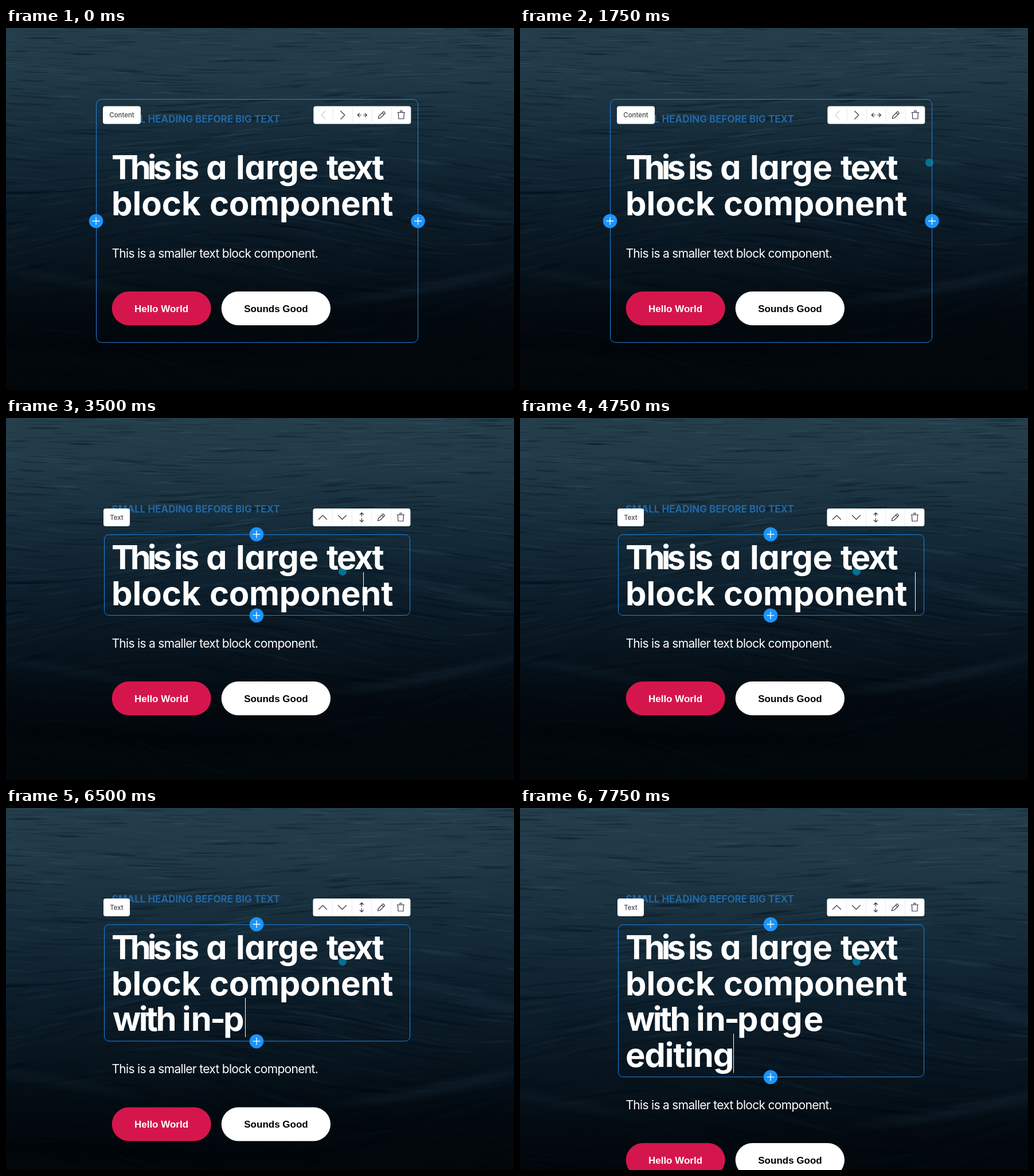
Animation of 886x632 px, one loop 8000 ms. Source, as an HTML page with a canvas:

```html
<!DOCTYPE html>
<html lang="en">
<head>
<meta charset="utf-8">
<title>In-page editing</title>
<style>
  html, body { margin: 0; width: 100%; height: 100%; overflow: hidden; background: #03080c; }
  canvas, svg { position: absolute; left: 0; top: 0; width: 886px; height: 632px; }
  canvas { transform-origin: 50% 0; }
  text { font-family: Inter, "Open Sans", sans-serif; font-optical-sizing: none; white-space: pre; }
  .eyebrow { font-size: 17px; font-weight: 700; fill: #2067a6; }
  .title { font-size: 58px; font-weight: 700; fill: #fff; font-feature-settings: "cv11" 1; }
  .body { font-size: 21px; letter-spacing: -.7px; fill: #fff; }
  .button { font: bold 17px "Liberation Sans", Arial, sans-serif; text-anchor: middle; }
  .tag { font-size: 11.4px; font-weight: 500; fill: #45424f; text-anchor: middle; }
  .frame { fill: none; stroke: #1d86e8; }
  .icon { fill: none; stroke: #3c3a4a; stroke-width: 1.2; stroke-linecap: round; stroke-linejoin: round; }
  .off { stroke: #cfcfd6; }
</style>
</head>
<body>
<canvas id="sea" width="886" height="632"></canvas>
<svg id="ui" viewBox="0 0 886 632"></svg>
<script>
const LOOP = 8000, STEP = 250, LINE = 62.5;
const sea = document.getElementById('sea'), ui = document.getElementById('ui');

// ---- Water ----
function paintSea() {
  const ctx = sea.getContext('2d');
  let seed = 7;
  const random = () => (seed = (seed * 16807) % 2147483647) / 2147483647;
  const shade = ctx.createLinearGradient(0, 0, 0, 632);
  [[0, '#253e4b'], [.13, '#213a47'], [.3, '#162c3a'], [.47, '#0d1f2c'],
   [.63, '#08151f'], [.8, '#03090e'], [1, '#02070a']].forEach(([at, color]) => shade.addColorStop(at, color));
  ctx.fillStyle = shade;
  ctx.fillRect(0, 0, 886, 632);

  const ripple = (x, y, length, drop, bulge, thick, color) => {
    ctx.fillStyle = color;
    ctx.beginPath();
    ctx.moveTo(x, y);
    ctx.quadraticCurveTo(x + length / 2, y + drop / 2 - bulge, x + length, y + drop);
    ctx.quadraticCurveTo(x + length / 2, y + drop / 2 - bulge + thick, x, y);
    ctx.fill();
  };
  ctx.filter = 'blur(.7px)';
  for (let i = 0; i < 1500; i++) {
    const depth = random() ** 1.25, y = depth * 600, x = random() * 1000 - 110;
    const length = 30 + random() * (50 + depth * 130);
    const slope = depth * .38 * Math.sin(x / 150 + y / 85);
    const light = random() < .45;
    const alpha = (.1 + random() * .2) * (light ? Math.max(.1, 1 - depth * 1.15) : 1);
    ripple(x, y, length, length * slope, random() * (3 + depth * 10), 2 + random() * (3 + depth * 11),
      light ? `rgba(66,100,120,${alpha})` : `rgba(3,13,22,${alpha})`);
  }
  // Broad swells
  ctx.filter = 'blur(6px)';
  ripple(540, 480, 420, -85, -14, 26, 'rgba(38,62,80,.3)');
  ripple(-60, 415, 330, 55, 18, 24, 'rgba(30,52,68,.25)');
  ripple(640, 270, 300, 75, 10, 30, 'rgba(42,68,86,.25)');
  ripple(-40, 545, 640, 25, 16, 34, 'rgba(0,3,6,.5)');
}

// ---- Editor controls ----
const ICONS = {
  chevron: 'M3.5-7L-3.5 0L3.5 7',
  arrows: 'M-2 0H-8M-5-3L-8 0L-5 3M2 0H8M5-3L8 0L5 3',
  pencil: 'M-6 6L-5 2L3-6Q4.5-6.5 6-3L-2 5ZM1-4L4-1',
  trash: 'M-6.3-4.5H6.3M-1.5-4.5V-7.5H1.5V-4.5M-5-4.5L-4.5 6.5H4.5L5-4.5'
};
const rect = (x, y, w, h, r, attrs) => `<rect x="${x}" y="${y}" width="${w}" height="${h}" rx="${r}" ${attrs}/>`;
const text = (cls, x, y, value, attrs = '') => `<text class="${cls}" x="${x}" y="${y}" ${attrs}>${value}</text>`;
const icon = (name, x, y, turn = 0, cls = '') =>
  `<path class="icon ${cls}" d="${ICONS[name]}" transform="translate(${x} ${y}) rotate(${turn})"/>`;
const plus = (x, y) => `<circle cx="${x}" cy="${y}" r="12.3" fill="#1b94fb"/>` +
  `<path d="M${x - 6.5} ${y}h13M${x} ${y - 6.5}v13" stroke="#fff" stroke-width="1.3"/>`;

function controls(label, tagX, tagWidth, barX, y, vertical) {
  const mid = y + 15.5, at = i => barX + 17 + i * 34, turn = vertical ? 90 : 0;
  let out = rect(tagX, y, tagWidth, 31, 4, 'fill="#fff"') +
    text('tag', tagX + tagWidth / 2, mid + 4.2, label) + rect(barX, y, 170, 31, 4, 'fill="#fff"');
  for (let i = 1; i < 5; i++) out += rect(barX + i * 34 - .5, y, 1, 31, 0, 'fill="#ececf0"');
  return out + icon('chevron', at(0), mid, turn, vertical ? '' : 'off') +
    icon('chevron', at(1), mid, turn + 180) + icon('arrows', at(2), mid, turn) +
    icon('pencil', at(3), mid) + icon('trash', at(4), mid);
}

// ---- Title: word, x, letter spacing ----
const FIRST = [['This', 184, -6], ['is', 293, -4], ['a', 349, 0], ['large', 401, -.4], ['text', 559, -3]];
const SECOND = [['block', 184, 0], ['component', 355, -.3]];
const THIRD = [['with', 186, -3.6], ['in', 307, 0], ['-', 356, 0], ['page', 379, 2], ['edit', 543, -1.3]];
const THIRD_STARTS = [0, 5, 7, 8, 13];
const FOURTH = [['editing', 184, -1.2]];
const words = (list, line) => list.map(([word, x, gap]) =>
  text('title', x, 264 + line * LINE, word, `letter-spacing="${gap}"`)).join('');

// Typed characters on the third line and caret x, from each time on
const TYPING = [[5250, 2, 243], [5500, 3, 260], [5750, 5, 309], [6000, 7, 357], [6250, 8, 380], [6500, 9, 417],
  [6750, 12, 528], [7000, 13, 543], [7250, 15, 617], [7500, 17, 647], [7750, 12, 372]];
// Caret x and line before typing (null hides it)
const CARET = [[0, null], [2750, 574, 0], [3250, null], [3500, 623, 1], [3750, 674, 1], [4250, null], [4750, 689, 1]];
const POINTER = [[1500, 738, 190], [1750, 714, 235], [2000, 665, 279], [2250, 589, 286], [2500, 587, 268],
  [2750, 586, 286], [3000, 584, 285], [3250, 582, 285], [3500, 587, 268]];
const current = (list, t) => list.filter(entry => entry[0] <= t).pop();

function draw(t) {
  const typing = current(TYPING, t), pointer = current(POINTER, t);
  const extra = !typing ? 0 : t < 7750 ? 1 : 2, shift = extra * LINE;
  sea.style.transform = `scale(${1 + extra * .08})`;

  let out = text('eyebrow', 184.5, 165, 'SMALL HEADING BEFORE BIG TEXT');
  if (pointer) out += `<circle cx="${pointer[1]}" cy="${pointer[2]}" r="7" fill="#087094"/>`;
  out += words(FIRST, 0) + words(SECOND, 1);
  if (typing) {
    out += words(THIRD.map(([word, x, gap], i) =>
      [word.slice(0, Math.max(0, typing[1] - THIRD_STARTS[i])), x, gap]), 2);
  }
  if (extra === 2) out += words(FOURTH, 3);

  out += text('body', 184.5, 400.5 + shift, 'This is a smaller text block component.') +
    rect(184.7, 460 + shift, 173, 59, 29.5, 'fill="#d5164c"') +
    text('button', 271, 495.7 + shift, 'Hello World', 'fill="#fff"') +
    rect(375.7, 460 + shift, 190.3, 59, 29.5, 'fill="#fff"') +
    text('button', 471, 495.7 + shift, 'Sounds Good', 'fill="#000"');

  if (t < 2000) {
    out += rect(157.5, 124.5, 561, 424.5, 9, 'class="frame"') + plus(157, 337) + plus(718.5, 337) +
      controls('Content', 169, 66, 536.3, 136.5, false);
  } else {
    out += rect(171.5, 203.7, 533, 140.8 + shift, 8, 'class="frame"') + plus(437, 203) + plus(437, 344.7 + shift) +
      controls('Text', 170, 46, 535.4, 158, true);
  }

  const [, x, line] = typing ? [0, typing[2], extra + 1] : current(CARET, t);
  if (x) {
    const top = line ? 269 + (line - 1) * LINE : 210;
    out += rect(x, top, 1, line ? 68.5 : 65, 0, 'fill="#fff"');
  }
  ui.innerHTML = out;
}

let shown = -1;
function tick() {
  const t = Math.floor(performance.now() % LOOP / STEP) * STEP;
  if (t !== shown) draw(shown = t);
  requestAnimationFrame(tick);
}
paintSea();
tick();
</script>
</body>
</html>
```
